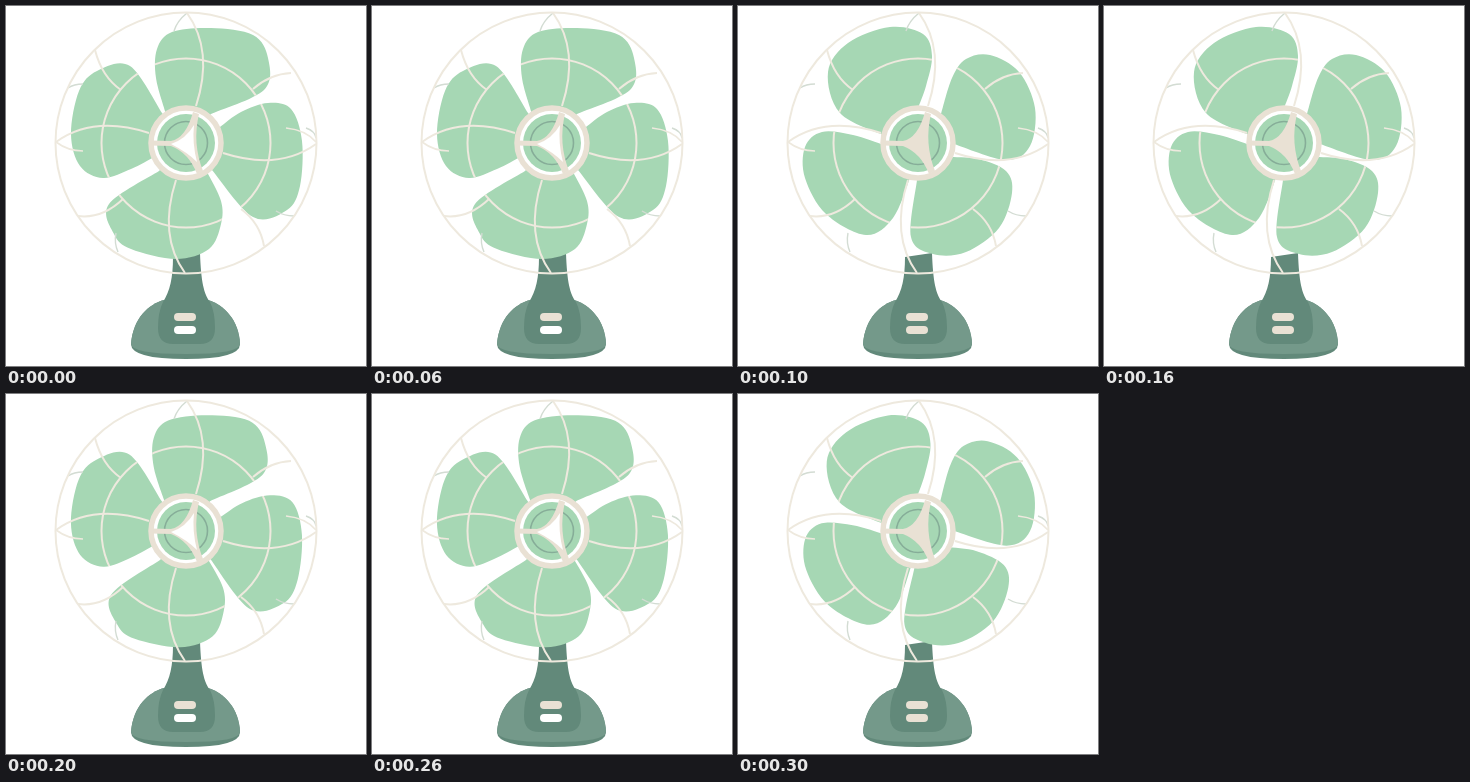
An HTML page with a canvas that plays this animation: 360x360 px, repeating every 400 ms.

```html
<!DOCTYPE html>
<html lang="en">
<head>
<meta charset="utf-8">
<title>Desk fan</title>
<style>
  html, body { margin: 0; width: 100%; height: 100%; overflow: hidden; background: #fff; }
  canvas { display: block; width: 100vw; height: 100vh; }
</style>
</head>
<body>
<canvas id="stage"></canvas>
<script>
const canvas = document.getElementById('stage');
const ctx = canvas.getContext('2d');
const CX = 180, CY = 137, STEP = 100;
const GREEN = '#a6d7b4', CREAM = '#eee9de', BEIGE = '#e9e1d4';
const DARK = '#62897a', BASE = '#74998a', TICK = '#d3dcd3';

// Blade outlines from hub edge to hub edge, clockwise from the top.
const upright = [
  [160,108, 150,72, 151,43, 166,26, 205,22, 247,29, 262,52, 258,84, 205,108],
  [214,121, 235,106, 262,97, 285,103, 296,135, 294,180, 281,204, 247,211, 206,164],
  [201,166, 215,195, 215,218, 203,243, 170,253, 125,243, 108,228, 103,198, 153,165],
  [148,151, 125,163, 97,172, 74,160, 65,128, 73,85, 91,65, 124,60, 156,107]
];
const diagonal = [
  [203,108, 214,72, 228,53, 252,49, 281,66, 297,102, 292,140, 268,154, 216,138],
  [210,151, 240,153, 268,165, 274,187, 261,222, 228,246, 195,248, 173,231, 179,174],
  [172,172, 155,212, 128,229, 88,208, 67,172, 67,141, 84,126, 115,129, 146,139],
  [147,130, 102,107, 90,66, 110,37, 152,21, 185,28, 194,50, 188,80, 180,102]
];

// Each blade wobbles by its own few degrees.
const poses = [
  { blades: upright, turns: [0, 0, 0, 0], white: true },
  { blades: diagonal, turns: [0, 0, 0, 0] },
  { blades: upright, turns: [-2, 3, -2, -.5], white: true },
  { blades: diagonal, turns: [-1.5, 4, -2, -1] }
];

function bladePath(flat, degrees) {
  const a = degrees * Math.PI / 180, c = Math.cos(a), s = Math.sin(a);
  const pts = [];
  for (let i = 0; i < flat.length; i += 2) {
    const x = flat[i] - CX, y = flat[i + 1] - CY;
    pts.push([CX + x * c - y * s, CY + x * s + y * c]);
  }
  const path = new Path2D();
  path.moveTo(...pts[0]);
  for (let i = 0; i < pts.length - 1; i++) {
    const p = pts[i], q = pts[i + 1];
    const before = pts[i - 1] || p, after = pts[i + 2] || q;
    path.bezierCurveTo(
      p[0] + (q[0] - before[0]) / 6, p[1] + (q[1] - before[1]) / 6,
      q[0] - (after[0] - p[0]) / 6, q[1] - (after[1] - p[1]) / 6, ...q);
  }
  path.lineTo(CX, CY);
  path.closePath();
  return path;
}

for (const pose of poses) {
  pose.shape = new Path2D();
  pose.blades.forEach((b, i) => pose.shape.addPath(bladePath(b, pose.turns[i])));
}

function fill(path, color) {
  ctx.fillStyle = color;
  ctx.fill(typeof path === 'string' ? new Path2D(path) : path);
}

function stroke(path, color, width) {
  ctx.strokeStyle = color;
  ctx.lineWidth = width;
  ctx.stroke(new Path2D(path));
}

function circle(r, color, width) {
  ctx.beginPath();
  ctx.arc(CX, CY, r, 0, 2 * Math.PI);
  if (width) {
    ctx.strokeStyle = color;
    ctx.lineWidth = width;
    ctx.stroke();
  } else {
    ctx.fillStyle = color;
    ctx.fill();
  }
}

function button(y, color) {
  ctx.beginPath();
  ctx.roundRect(168, y, 22, 8, 4);
  ctx.fillStyle = color;
  ctx.fill();
}

function drawStand(white) {
  fill('M125 338C127 312 143 298 158 294H202C218 299 233 314 234 338Q234 353 180 353Q125 353 125 338Z', DARK);
  fill('M125 338C127 312 143 298 158 294H202C218 299 233 314 234 338Q234 348 180 348Q125 348 125 338Z', BASE);
  fill('M167 251L194 247C195 276 198 288 204 296Q209 306 209 322Q209 338 194 338H167Q152 338 152 322Q152 306 157 296C164 285 167 272 167 251Z', DARK);
  button(307, BEIGE);
  button(320, white ? '#fff' : BEIGE);
}

function drawGuard(shape) {
  stroke('M62 82Q68 78 77 78M300 122Q309 125 310 132M270 205Q278 210 288 210M110 227Q108 237 112 246M181 7Q171 15 168 25', TICK, 1.4);
  stroke('M50 136Q62 145 77 145M310 136Q300 124 280 122', CREAM, 1.6);
  for (let i = 0; i < 4; i++) {
    ctx.save();
    ctx.translate(CX, CY);
    ctx.rotate(i * Math.PI / 2);
    stroke('M1 -130C19 -105 22 -74 10 -37', CREAM, 2);
    ctx.restore();
  }
  stroke('M89 44Q96 71 115 84M247 83Q264 68 285 67M72 210Q96 213 117 193M235 203Q254 217 258 240', CREAM, 2);
  ctx.save();
  ctx.clip(shape);
  circle(84.5, CREAM, 2);
  ctx.restore();
  circle(130.5, CREAM, 2);
}

function drawHub(white) {
  circle(37, '#fff');
  circle(29, GREEN);
  circle(21.5, '#86ad98', 1.6);
  fill('M144 134.5L165 135Q180 132 187 106L193 108Q186 137 197 165L191 168Q183 147 165 140L144 139.5Z', BEIGE);
  if (white) fill('M165 138Q180 133 188 119Q186 137 191 156Q181 146 165 138Z', '#fff');
  circle(35, BEIGE, 5.5);
}

function draw(now) {
  const ratio = window.devicePixelRatio || 1;
  const w = Math.round(innerWidth * ratio), h = Math.round(innerHeight * ratio);
  if (canvas.width !== w || canvas.height !== h) {
    canvas.width = w;
    canvas.height = h;
  }
  ctx.setTransform(w / 360, 0, 0, h / 360, 0, 0);
  ctx.fillStyle = '#fff';
  ctx.fillRect(0, 0, 360, 360);

  const { shape, white } = poses[Math.floor(now / STEP) % poses.length];
  drawStand(white);
  fill(shape, GREEN);
  drawGuard(shape);
  drawHub(white);
}

const start = performance.now();
function tick() {
  draw(performance.now() - start);
  requestAnimationFrame(tick);
}
tick();
</script>
</body>
</html>
```
